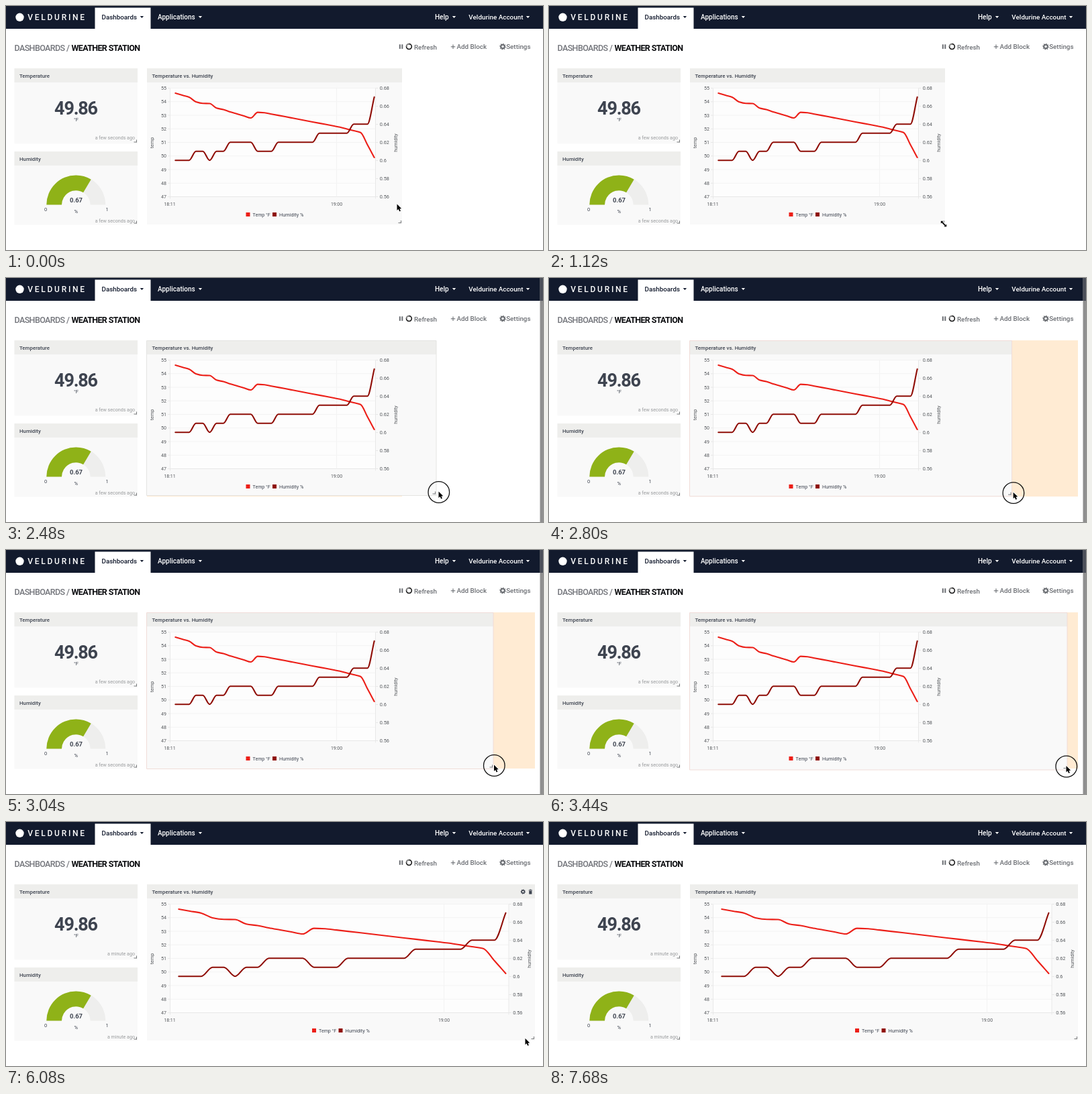
Recreate the animation shown at these times as an HTML page with a canvas. Size 800x364 px, loop 7760 ms.

```html
<!DOCTYPE html>
<html lang="en">
<head>
<meta charset="utf-8">
<title>Weather station dashboard</title>
<style>
  html, body { margin: 0; width: 100%; height: 100%; overflow: hidden; background: #fff; }
  canvas { display: block; width: 800px; height: 364px; }
</style>
</head>
<body>
<canvas id="stage"></canvas>
<script>
const W = 800, H = 364, LOOP = 7760, STEP = 80;
const canvas = document.getElementById('stage');
const ctx = canvas.getContext('2d');
const dpr = window.devicePixelRatio || 1;
canvas.width = W * dpr;
canvas.height = H * dpr;

const FONT = 'Roboto, "Open Sans", sans-serif';
const NAVY = '#121a2d', INK = '#3e4450', GREY = '#6b6e73', PALE = '#999b9d';
const RED = '#ec1f18', MAROON = '#8f0d06', GREEN = '#8fb218';

// Moments of the interaction, in ms
const RESIZE_AT = 880, PRESS = 1840, DRAG = 1920, RELEASE = 3760, RELAYOUT = 4160, LEAVE = 6800;

// time, pointer x, pointer y, right edge of the chart block
const PATH = [
  [0, 582.5, 295.5, 590],
  [160, 582.5, 295.5, 590],
  [720, 587, 321, 590],
  [960, 588, 324.5, 590],
  [DRAG, 588, 324.5, 590],
  [2160, 604, 321, 604],
  [2480, 644.5, 318.5, 641],
  [3040, 727, 320.5, 726],
  [3440, 770.5, 322, 772],
  [3680, 773.5, 322.8, 777],
  [LOOP, 773.5, 322.8, 777]
];

function pose(t) {
  let i = 1;
  while (PATH[i][0] < t) i++;
  const a = PATH[i - 1], b = PATH[i];
  const k = (t - a[0]) / (b[0] - a[0]);
  const [, x, y, right] = a.map((v, n) => v + (b[n] - v) * k);
  return { x, y, right };
}

// Chart data: 30 samples
const temps = [130, 133, 136, 143, 145.3, 145.5, 152.3, 154.5, 158, 161, 164, 167, 158.6];
for (let i = 13; i < 25; i++) temps.push(159.2 + (i - 13) * 1.96);
temps.push(183.4, 186, 188.8, 207, 226);

const humid = [];
for (const [count, pct] of [[3, 60], [2, 61], [1, 60], [2, 61], [4, 62], [3, 61], [6, 62], [5, 63], [3, 64], [1, 67]])
  for (let i = 0; i < count; i++) humid.push(230.2 - (pct - 60) * 13.5);

function rect(x, y, w, h, color) {
  ctx.fillStyle = color;
  ctx.fillRect(x, y, w, h);
}

function text(str, x, y, size, color, { weight = 400, align = 'left', gap = 0 } = {}) {
  ctx.font = `${weight} ${size}px ${FONT}`;
  ctx.letterSpacing = gap + 'px';
  ctx.textAlign = align;
  ctx.fillStyle = color;
  ctx.fillText(str, x, y);
}

function line(x1, y1, x2, y2, color, width = 1) {
  ctx.strokeStyle = color;
  ctx.lineWidth = width;
  ctx.beginPath();
  ctx.moveTo(x1, y1);
  ctx.lineTo(x2, y2);
  ctx.stroke();
}

function poly(points, color, outline) {
  ctx.beginPath();
  points.forEach(([x, y]) => ctx.lineTo(x, y));
  ctx.closePath();
  if (outline) {
    ctx.strokeStyle = outline;
    ctx.lineWidth = 1.6;
    ctx.lineJoin = 'round';
    ctx.stroke();
  }
  ctx.fillStyle = color;
  ctx.fill();
}

function circle(x, y, r, color, stroke = 0) {
  ctx.beginPath();
  ctx.arc(x, y, r, 0, Math.PI * 2);
  ctx.lineWidth = stroke;
  ctx.fillStyle = ctx.strokeStyle = color;
  stroke ? ctx.stroke() : ctx.fill();
}

function upright(str, x, y) {
  ctx.save();
  ctx.translate(x, y);
  ctx.rotate(-Math.PI / 2);
  text(str, 0, 0, 7.2, '#55585c', { align: 'center' });
  ctx.restore();
}

function caret(x, color) {
  poly([[x, 15], [x + 5.4, 15], [x + 2.7, 18]], color);
}

function gear(x, y, r, color) {
  ctx.beginPath();
  for (let i = 0; i < 32; i++) {
    const a = (i + 0.5) / 32 * Math.PI * 2, d = i % 4 < 2 ? r : r * 0.75;
    ctx.lineTo(x + Math.cos(a) * d, y + Math.sin(a) * d);
  }
  ctx.closePath();
  ctx.moveTo(x + r * 0.36, y);
  ctx.arc(x, y, r * 0.36, 0, Math.PI * 2);
  ctx.fillStyle = color;
  ctx.fill('evenodd');
}

function trash(x, y) {
  rect(x - 2.6, y - 2.6, 5.2, 1, INK);
  rect(x - 1, y - 3.5, 2, 1, INK);
  rect(x - 2.1, y - 1.2, 4.2, 4.8, INK);
}

function grip(x, y) {
  line(x - 4, y, x, y, '#77797b');
  line(x, y + 0.5, x, y - 3.5, '#77797b');
}

function block(x, y, right, bottom, title) {
  rect(x, y, right - x, bottom - y, '#f9f9f9');
  rect(x, y, right - x, 21, '#eeeeec');
  text(title, x + 7.4, y + 13.7, 7.9, INK, { weight: 500 });
  grip(right - 1.5, bottom - 2.5);
}

function topBar() {
  rect(0, 0, W, 34, NAVY);
  circle(20.5, 16.8, 6.2, '#fff');
  text('VELDURINE', 32.2, 21, 12, '#fff', { weight: 500, gap: 2.75 });
  rect(132.5, 2.5, 83, 31.5, '#fff');
  const bold = { weight: 500 };
  text('Dashboards', 142.5, 20, 9.8, NAVY, bold);
  text('Applications', 226, 20, 10, '#fff', bold);
  text('Help', 639, 20, 10, '#fff', bold);
  text('Veldurine Account', 770.5, 20, 9.9, '#fff', { weight: 500, align: 'right' });
  caret(199.7, NAVY);
  [286.7, 664.8, 774.8].forEach(x => caret(x, '#fff'));
}

function toolBar() {
  const bold = { weight: 500 };
  text('DASHBOARDS /', 12.5, 66.8, 12.5, '#74767c', { weight: 500, gap: -0.6 });
  text('WEATHER STATION', 97.5, 66.8, 12.5, '#0c0d10', { weight: 700, gap: -0.65 });
  rect(585.8, 57.3, 2, 6.6, GREY);
  rect(589.3, 57.3, 2, 6.6, GREY);
  circle(600.4, 60.6, 3.9, '#222', 1.7);
  ctx.beginPath();
  ctx.arc(600.4, 60.6, 3.9, -Math.PI, -Math.PI / 2);
  ctx.strokeStyle = '#8a8a8a';
  ctx.stroke();
  text('Refresh', 608, 65, 9.8, GREY, bold);
  line(662.8, 60.8, 669.2, 60.8, GREY, 1.1);
  line(666, 57.6, 666, 64, GREY, 1.1);
  text('Add Block', 671.5, 64.2, 9.8, GREY, bold);
  gear(740, 60.6, 4.9, GREY);
  text('Settings', 745.2, 64.2, 9.8, GREY, bold);
}

function readings(age) {
  const mid = { align: 'center' };
  block(12.5, 93, 196, 205.5, 'Temperature');
  text('49.86', 104, 162, 27, INK, { weight: 700, align: 'center', gap: -1.2 });
  text('°F', 104.5, 172, 7.6, INK, mid);
  text(age, 192, 198.8, 7.1, PALE, { align: 'right' });

  block(12.5, 217, 196, 326.5, 'Humidity');
  const end = -Math.PI * 0.33;
  for (const [from, to, color] of [[-Math.PI, 0, '#eeeeed'], [-Math.PI, end, GREEN]]) {
    ctx.beginPath();
    ctx.arc(104.3, 296.5, 44, from, to);
    ctx.arc(104.3, 296.5, 21.3, to, from, true);
    ctx.fillStyle = color;
    ctx.fill();
  }
  text('0.67', 104.5, 292.6, 9.5, INK, { weight: 700, align: 'center' });
  text('0', 59, 306.3, 7.5, INK, mid);
  text('1', 150.5, 306.3, 7.5, INK, mid);
  text('%', 104.3, 309.3, 7.6, INK, mid);
  text(age, 192, 322.6, 7.1, PALE, { align: 'right' });
}

// Monotone cubic through evenly spaced samples
function curve(ys, x0, dx, color) {
  const slope = ys.map((y, i) => {
    if (i === 0 || i === ys.length - 1) return i ? y - ys[i - 1] : ys[1] - y;
    const a = y - ys[i - 1], b = ys[i + 1] - y;
    return a * b > 0 ? 2 * a * b / (a + b) : 0;
  });
  ctx.beginPath();
  ctx.moveTo(x0, ys[0]);
  for (let i = 1; i < ys.length; i++) {
    const x = x0 + dx * i;
    ctx.bezierCurveTo(x - dx * 2 / 3, ys[i - 1] + slope[i - 1] / 3,
      x - dx / 3, ys[i] - slope[i] / 3, x, ys[i]);
  }
  ctx.strokeStyle = color;
  ctx.lineWidth = 2.1;
  ctx.lineCap = ctx.lineJoin = 'round';
  ctx.stroke();
  ctx.lineCap = 'butt';
}

function chart(wide) {
  const right = wide ? 749 : 550.5, noon = wide ? 652.5 : 492.5;
  const tick = '#55585c', axis = '#e8e8e8', grid = '#f3f3f3';
  rect(244.5, 122.5, right - 244.5, 162, '#fdfdfd');
  for (let i = 0; i <= 8; i++) {
    const y = 122.5 + i * 20.25;
    line(241, y, 244.5, y, axis);
    line(244.5, y, right, y, i === 8 ? axis : grid);
    text(String(55 - i), 239, y + 2.5, 7.1, tick, { align: 'right' });
  }
  for (let i = 0; i <= 6; i++) {
    const y = 122.5 + i * 27;
    line(right, y, right + 4, y, axis);
    text(String(+(0.68 - i * 0.02).toFixed(2)), right + 6.2, y + 2.5, 7.3, tick);
  }
  line(noon, 122.5, noon, 284.5, grid);
  [244.5, right].forEach(x => line(x, 122.5, x, 287.5, axis));
  text('18:11', 244, 297.6, 6.9, tick, { align: 'center' });
  text('19:00', noon, 297.6, 6.9, tick, { align: 'center' });
  upright('temp', 219.8, 204);
  upright('humidity', right + 32.5, 204);

  const x0 = wide ? 257.3 : 252.3, dx = wide ? 16.8 : 10.22;
  curve(temps, x0, dx, RED);
  curve(humid, x0, dx, MAROON);

  const lx = wide ? 456 : 357.5;
  rect(lx, 308, 6, 6, RED);
  text('Temp °F', lx + 10, 313.8, 7.1, INK);
  rect(lx + 39.5, 308, 6, 6, MAROON);
  text('Humidity %', lx + 49.5, 313.8, 7.3, INK);
}

function arrow(x, y) {
  const shape = [[0, 0], [0, 9.4], [2.1, 7.5], [3.7, 11], [5.4, 10.2], [3.9, 6.9], [6.7, 6.7]];
  poly(shape.map(([px, py]) => [x + px, y + py]), '#000', '#fff');
}

function resizer(x, y) {
  const shape = [[-4.2, -4.2], [-0.4, -4.2], [-1.7, -2.9], [2.9, 1.7], [4.2, 0.4],
    [4.2, 4.2], [0.4, 4.2], [1.7, 2.9], [-2.9, -1.7], [-4.2, -0.4]];
  poly(shape.map(([px, py]) => [x + px, y + py]), '#000', '#fff');
}

function draw(t) {
  const { x, y, right } = pose(t);
  const dragging = t >= DRAG && t < RELEASE;
  const wide = t >= RELAYOUT;
  const edge = dragging ? right : t < DRAG ? 590 : 788;
  const bottom = dragging ? y + 6 : 326;

  ctx.setTransform(dpr, 0, 0, dpr, 0, 0);
  rect(0, 0, W, H, '#fff');
  topBar();
  toolBar();
  readings(wide ? 'a minute ago' : 'a few seconds ago');

  if (dragging) rect(210, 93, (right > 689 ? 788 : 590) - 210, 233, '#ffebd3');
  block(210, 93, edge, bottom, 'Temperature vs. Humidity');
  if (dragging) {
    ctx.strokeStyle = right > 689 ? '#f0dcd8' : '#e4e4e2';
    ctx.lineWidth = 1;
    ctx.strokeRect(209.5, 93.5, edge - 209.5, bottom - 93.5);
  }
  chart(wide);

  if (wide && t < LEAVE) {
    gear(770.3, 104, 3.7, INK);
    trash(781.3, 104);
  }
  if (dragging) {
    rect(795.5, 0, 4.5, H, '#8f8f8f');
    rect(795.5, 0, 4.5, 34, '#4c505a');
  }
  if (t >= PRESS && t < RELEASE) circle(x + 0.3, y + 1, 15.8, '#111', 1.3);
  if (t >= RESIZE_AT && t < DRAG) resizer(x, y + 0.5);
  else if (t < LEAVE) arrow(x, y);
}

const start = performance.now();
function tick() {
  const t = (performance.now() - start) % LOOP;
  draw(Math.floor(t / STEP) * STEP);
  requestAnimationFrame(tick);
}
tick();
</script>
</body>
</html>
```
